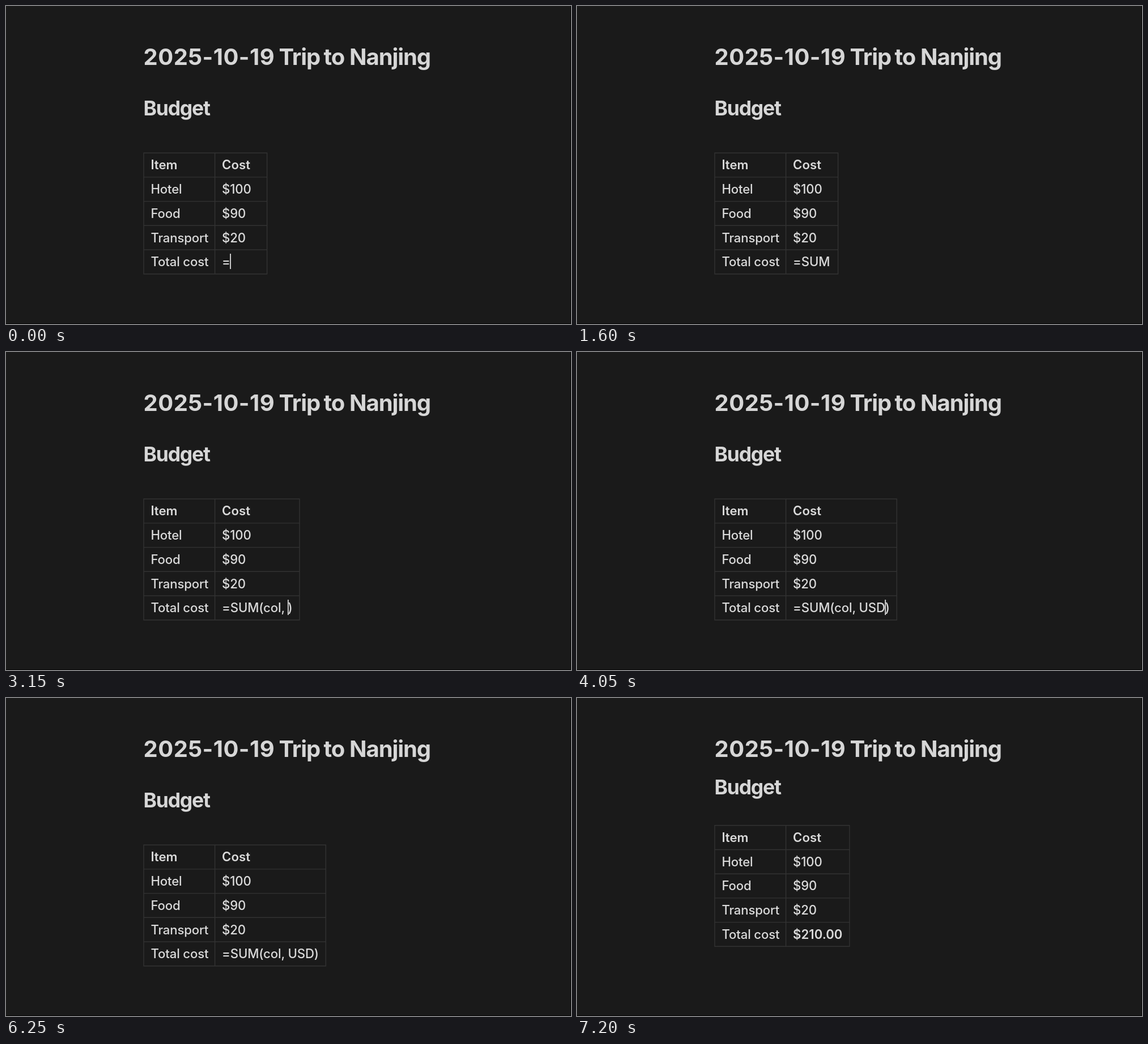
An HTML page that plays this animation: 997x561 px, repeating every 8 s.

```html
<!DOCTYPE html>
<html lang="en">
<head>
<meta charset="utf-8">
<title>Trip budget</title>
<style>
  html, body { margin: 0; width: 997px; height: 561px; overflow: hidden; background: #1a1a1a; }
  svg { display: block; }
  text { font: 450 22.2px Inter, sans-serif; font-optical-sizing: none; letter-spacing: -.007em; fill: #dadada; white-space: pre; }
  .bold { font-weight: 640; letter-spacing: 0; }
  .title { font-size: 40px; font-weight: 700; letter-spacing: -.027em; fill: #d6d6d6; }
  .date { letter-spacing: .011em; }
  .heading { font-size: 35.5px; font-weight: 700; letter-spacing: -.033em; fill: #d6d6d6; }
  #grid { fill: none; stroke: #323232; stroke-width: 1.4; }
</style>
</head>
<body>
<svg id="stage" width="997" height="561" viewBox="0 0 997 561">
  <path d="M0 560.5H996.5V0" fill="none" stroke="#060606"/>
  <g id="table">
    <path id="grid"/>
    <rect id="caret" y="437" width="1.8" height="27" fill="#dadada"/>
  </g>
</svg>
<script>
const LOOP = 8000, RENDERED = 6450;
const LEFT = 243, SPLIT = 368.6, TOP = 259.2, ROW = 42.7;
const ITEM_X = 255.4, COST_X = 381.1, PAD = 12.4, MIN_RIGHT = 460.6;

// Cell content after each keystroke
const typing = [
  [0, '='], [600, '=S'], [750, '=SU'], [950, '=SUM'], [1850, '=SUM()'],
  [2150, '=SUM(c)'], [2400, '=SUM(co)'], [2600, '=SUM(col)'],
  [2900, '=SUM(col,)'], [3050, '=SUM(col, )'], [3650, '=SUM(col, U)'],
  [3800, '=SUM(col, US)'], [4000, '=SUM(col, USD)'], [RENDERED, '$210.00']
];
const caretHidden = [[200, 600], [1600, 1850], [4850, 5370], [5900, LOOP]];

const byId = id => document.getElementById(id);
const stage = byId('stage'), table = byId('table'), grid = byId('grid'), caret = byId('caret');

function addText(parent, x, y, content, style = '') {
  const node = document.createElementNS('http://www.w3.org/2000/svg', 'text');
  node.setAttribute('x', x);
  node.setAttribute('y', y);
  node.setAttribute('class', style);
  node.textContent = content;
  return parent.appendChild(node);
}

addText(stage, 242.6, 104, '2025-10-19', 'title date');
addText(stage, 481.5, 104, 'Trip', 'title');
addText(stage, 560.6, 104, 'to', 'title');
addText(stage, 606.1, 104, 'Nanjing', 'title');
const heading = addText(stage, 242.4, 193, 'Budget', 'heading');

const rows = [['Item', 'Cost'], ['Hotel', '$100'], ['Food', '$90'], ['Transport', '$20'], ['Total cost', '=']];
let total;
rows.forEach(([item, cost], i) => {
  const y = TOP + i * ROW + 29.2, style = i ? '' : 'bold';
  addText(table, ITEM_X, y, item, style);
  total = addText(table, COST_X, y, cost, style);
});

function draw(time) {
  const content = typing.filter(([start]) => start <= time).pop()[1];
  const rendered = time >= RENDERED;
  if (total.textContent !== content) total.textContent = content;
  total.setAttribute('class', rendered ? 'bold' : '');
  heading.setAttribute('y', rendered ? 170 : 193);
  table.setAttribute('transform', `translate(0 ${rendered ? -34.4 : 0})`);

  const right = Math.max(MIN_RIGHT, COST_X + total.getComputedTextLength() + PAD);
  const bottom = TOP + rows.length * ROW;
  let lines = '';
  for (let i = 0; i <= rows.length; i++) lines += `M${LEFT - .7} ${TOP + i * ROW}H${right + .7}`;
  for (const x of [LEFT, SPLIT, right]) lines += `M${x} ${TOP}V${bottom}`;
  grid.setAttribute('d', lines);

  const typed = content.replace(/\)$/, '').length;
  caret.setAttribute('x', COST_X + total.getSubStringLength(0, typed) - .6);
  const hidden = caretHidden.some(([from, to]) => time >= from && time < to);
  caret.setAttribute('visibility', hidden ? 'hidden' : 'visible');
}

const begin = performance.now();
function tick() {
  draw((performance.now() - begin) % LOOP);
  requestAnimationFrame(tick);
}
tick();
</script>
</body>
</html>
```
